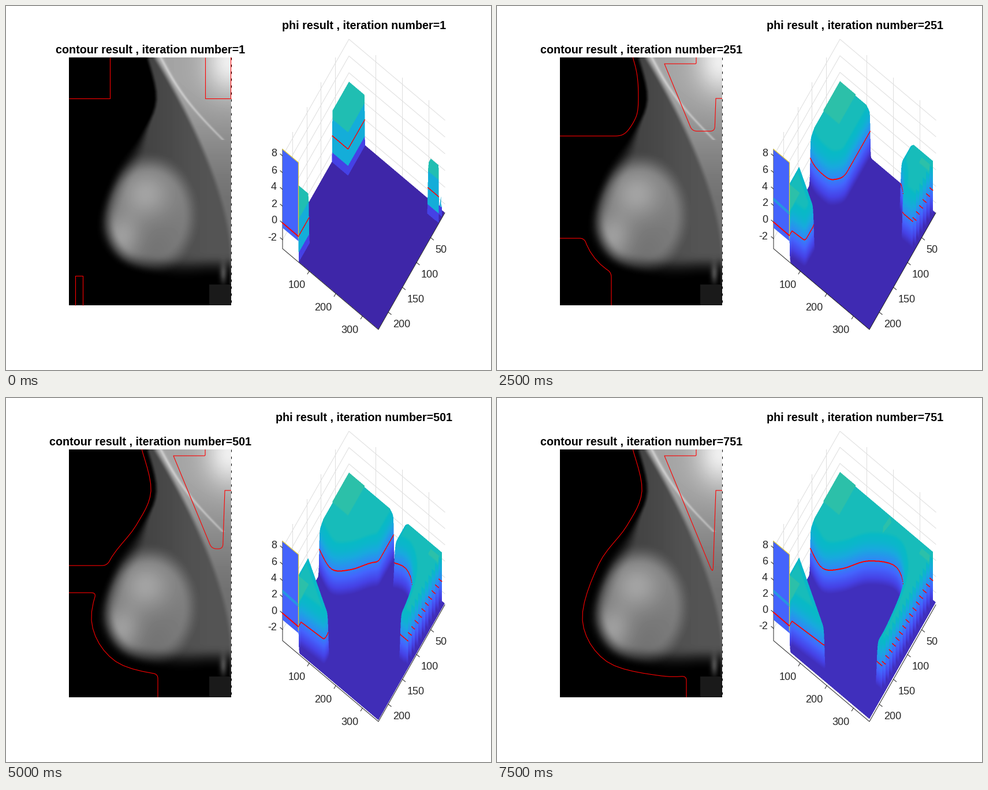
A matplotlib script that plays this animation: 840x630 px, repeating every 8000 ms.

```python
import numpy as np
import matplotlib.pyplot as plt
from matplotlib.animation import FuncAnimation
from matplotlib.colors import LinearSegmentedColormap

W, H = 840, 630
FRAMES, STEP = 16, 50
LAST = STEP * (FRAMES - 1)
SS = 2                                    # supersampling of the surface
COLS, ROWS = 235, 360
ORIGIN = np.array([594, 218])             # floor corner at column 0, row 0
CU = np.array([-115, 202]) / COLS         # screen step per column
RU = np.array([166, 140]) / ROWS          # screen step per row
X0, X1, Y0, Y1 = 109, 390, 89, 518        # image box
PX = (X1 - X0) / COLS
INK, GRID = "#262626", "#dedede"

PARULA = LinearSegmentedColormap.from_list("parula", [
    (0, "#3e26a8"), (.1, "#4642e6"), (.2, "#4464fe"), (.3, "#2d8cf3"),
    (.4, "#18aade"), (.5, "#08bac6"), (.53, "#2cc0aa"), (1, "#f9fb15")], N=512)


def smooth(d, a, b):
    t = np.clip((d - a) / (b - a), 0, 1)
    return t * t * (3 - 2 * t)


def curve(keys, n=6):
    """Catmull-Rom curve through a few key points."""
    p = np.array(keys[:1] + keys + keys[-1:], float)
    t = (np.arange(n) / n)[:, None]
    parts = [b + t * (c - a) / 2 + t**2 * (a - 2.5 * b + 2 * c - d / 2)
             + t**3 * (1.5 * (b - c) + (d - a) / 2)
             for a, b, c, d in zip(p, p[1:], p[2:], p[3:])]
    return [tuple(q) for q in np.vstack(parts + [p[-1:]])]


def sdf(x, y, pts):
    """Signed distance to a polygon, negative inside."""
    dist = np.full(x.shape, 1e9)
    inside = np.zeros(x.shape, bool)
    for (px_, py), (qx, qy) in zip(pts, pts[1:] + pts[:1]):
        ex, ey = qx - px_, qy - py
        t = np.clip(((x - px_) * ex + (y - py) * ey) / (ex * ex + ey * ey), 0, 1)
        dist = np.minimum(dist, (x - px_ - t * ex) ** 2 + (y - py - t * ey) ** 2)
        if ey:
            inside ^= ((py > y) != (qy > y)) & (x < px_ + (y - py) * ex / ey)
    return np.sqrt(dist) * np.where(inside, -1, 1)


def smax(a, b, k):
    """Maximum with its crease rounded over k."""
    h = np.maximum(k - np.abs(a - b), 0) / k
    return np.maximum(a, b) + h * h * k / 4


def corner(x, y, r):
    """Quarter plane x<0, y<0 with a rounded corner."""
    qx, qy = x + r, y + r
    return (np.minimum(np.maximum(qx, qy), 0)
            + np.hypot(np.maximum(qx, 0), np.maximum(qy, 0)) - r)


# What the growing regions cannot cross, in stage pixels
BODY = curve([(235, 88), (251, 161), (225, 221), (176, 288), (148, 385),
              (190, 456), (285, 481), (352, 479)])
BODY += [(500, 479), (500, -100), (235, -100)]
MUSCLE = [(290, 100), (374, 304), (379, 160), (379, 100)]


class Field:
    """Three regions that grow from seeds; negative inside."""

    def __init__(self, x, y):
        self.x, self.y = x, y
        self.body = sdf(x, y, BODY)
        self.muscle = sdf(x, y, MUSCLE)

    def at(self, it):
        x, y, n = self.x, self.y, it - 1
        g = .26 * n
        r, k = min(g, 40), min(8, .05 + .3 * g)
        a = smax(corner(x - 180 - g, y - 160 - g, r), -self.body, k)
        b = np.maximum(corner(x - 133 - g, 467 - g - y, r), 120 - g - x)
        b = smax(b, -self.body, k)
        c = smax(corner(345 - g - x, y - 160 - .56 * n**.836, r), self.muscle, k)
        c = np.minimum(c, corner(345 - x, y - 160, 0))
        return np.minimum(np.minimum(a, b), c)


def glow(x, y, cx, cy, rx, ry):
    return np.exp(-((x - cx) / rx) ** 2 - ((y - cy) / ry) ** 2)


def scan(x, y, body):
    """Soft grey tones standing in for the picture."""
    depth = -body - 6
    low = smooth(y, 190, 300)
    v = (66 + 18 * smooth(x, 220, 360)) * smooth(depth, -1, 8 + 32 * low)
    v = v * (1 - .65 * smooth(y, 425, 475))
    core = smooth(1 - np.hypot((x - 247) / 84, (y - 362) / 105), -.08, .3)
    tissue = 45 + 50 * glow(x, y, 240, 325, 45, 45) + 45 * glow(x, y, 200, 400, 34, 40)
    v = v + core * tissue * smooth(depth, 0, 20)
    rib = 390 - 132 * (np.clip(435 - y, 0, None) / 345) ** 1.6
    m = smooth(x - rib, -5, 7) * (y < 482)
    bright = 112 + 52 * smooth(-y, -360, -120) + 75 * glow(x, y, 388, 95, 42, 55)
    v = v * (1 - m) + bright * m
    s = (y - 92) / 140
    streak = x - 270 - 107 * s + 10 * np.sin(np.pi * s)
    v = v + 38 * np.exp(-(streak / 3) ** 2) * (s < 1)
    v = v + 70 * glow(x, y, 377, 464, 6, 16)
    v = np.where((y > 482) & (x > 352), 26, v)
    return np.clip(v, 0, 240)


ix, iy = np.meshgrid(np.arange(X0, X1 + 1.), np.arange(Y0, Y1 + 1.))
image_field = Field(ix, iy)

# Floor grid in screen space; every column of it is one line of sight
U0, U1, V0, V1, TOP = 478, 762, 216, 563, 100
su, sv = np.meshgrid(np.arange(U0, U1, 1 / SS) + .5 / SS,
                     np.arange(V0, V1, 1 / SS) + .5 / SS)
dx, dy = su - ORIGIN[0], sv - ORIGIN[1]
det = CU[0] * RU[1] - CU[1] * RU[0]
col = (dx * RU[1] - dy * RU[0]) / det
row = (CU[0] * dy - CU[1] * dx) / det
floor = (col >= 0) & (col <= COLS) & (row >= 0) & (row <= ROWS)
floor_field = Field(X0 + col * PX, Y0 + row * (Y1 - Y0) / ROWS)
seeds = floor_field.at(1) < -1

# Jagged cut along the last row; its long sides follow the line of sight
notch = 359 - 12.7 * (1 - ((col + 3) % 12) / 12)
teeth = np.where((row > 340) & (col < 195), 20 * (row - notch), -999)


def z_scale(it):
    """Height of z=0 above the axis floor and pixels per unit."""
    zero = 44.5 + 4.5 * (it - 1) / LAST
    return zero, (160.5 - zero) / 8


def heights(it):
    d = np.maximum(floor_field.at(it) / PX, teeth)
    if it == 1:
        return np.interp(d, [-1.5, -.5, .5, 1.5], [2.94, 1.95, -1.95, -3.05])
    t = np.tanh(-d / 1.6)
    z = np.where(d < 0, 2.35 * t + .4 * smooth(-d, 2, 16), 3.2 * t)
    return np.where(seeds & (d < -1), 2.94, z)


def surface(it):
    zero, k = z_scale(it)
    z = heights(it)
    p = (sv - TOP - zero - k * z) * SS
    ok = floor[:-1] & floor[1:]
    a, b, za, zb = p[:-1][ok], p[1:][ok], z[:-1][ok], z[1:][ok]
    u = np.nonzero(ok)[1]
    lo = np.floor(np.minimum(a, b)).astype(int)
    n = np.floor(np.maximum(a, b)).astype(int) - lo + 1
    i = np.repeat(np.arange(n.size), n)
    y = lo[i] + np.arange(n.sum()) - np.repeat(np.cumsum(n) - n, n)
    span = np.where(np.abs(b - a) < 1e-6, 1e-6, b - a)
    t = np.clip((y + .5 - a[i]) / span[i], 0, 1)
    buf = np.full(((V1 - TOP) * SS, su.shape[1]), np.nan)
    buf[np.clip(y, 0, len(buf) - 1), u[i]] = za[i] + (zb - za)[i] * t  # back to front

    solid = ~np.isnan(buf)
    h = np.where(solid, buf, -9)
    if it == 1:
        tone = np.select([h > 1.95, h > -1.95, h > -3.03], [.52, .42, .1], 0)
    else:
        tone = np.maximum((h + 3.2) / 11.6, .01 + .025 * it / LAST)
    rgba = PARULA(tone)
    rgba[..., 3] = solid
    zero_line = np.abs(h) * k * SS < 1
    wide = zero_line.copy()
    for shift in (1, -1):
        for axis in (0, 1):
            wide |= np.roll(zero_line, shift, axis)
    rgba[wide] = (1, 0, 0, 1)
    rgba[..., :3] *= rgba[..., 3:]
    hh, ww = buf.shape
    rgba = rgba.reshape(hh // SS, SS, ww // SS, SS, 4).mean((1, 3))
    rgba[..., :3] /= np.maximum(rgba[..., 3:], 1e-6)
    return np.clip(rgba, 0, 1)


plt.rcParams["font.family"] = "Liberation Sans"
fig = plt.figure(figsize=(W / 100, H / 100), dpi=100, facecolor="white")
ax = fig.add_axes([0, 0, 1, 1])
ax.axis("off")


def px(n):
    return n * .72


def line(xs, ys, color=INK, w=1, z=3, **kw):
    return ax.plot(xs, ys, color=color, lw=px(w), zorder=z, **kw)[0]


def label(x, y, s, size=18, ha="center", color=INK, **kw):
    return ax.text(x, y, s, fontsize=px(size), ha=ha, va="baseline", color=color, **kw)


def spot(c, r):
    return ORIGIN + c * CU + r * RU


title = dict(size=19.8, weight="bold", color="black")
left_title = label(249.7, 82, "", **title)
right_title = label(619.7, 40, "", **title)

ax.imshow(scan(ix, iy, image_field.body), cmap="gray", vmin=0, vmax=255,
          extent=(X0, X1, Y1, Y0), aspect="auto", zorder=1)
line([389.5, 389.5], [Y0, Y1], "black", 1, 2, ls=(0, (4, 8)))
rim = line([388.5, 388.5], [Y0, 160], "red", 1, 4)

# Walls, axes and ticks
for c in range(50, 201, 50):
    x, y = spot(c, 0)
    line([x, x], [y - 172, y], GRID, 1, 1)
    x, y = spot(c, ROWS)
    line([x, x + 5], [y, y + 4])
    label(x + 8, y + 26.5, str(c), ha="left")
for r in range(100, 301, 100):
    x, y = spot(0, r)
    line([x, x], [y - 172, y], GRID, 1, 1)
    x, y = spot(COLS, r)
    line([x, x - 3], [y, y + 5])
    label(x - 21.5, y + 29.5, str(r))
line([479, 479, 645, 760], [248, 420, 560, 358])
LEVELS = range(-2, 9, 2)
walls = [line([479, 594, 760], [0, 0, 0], GRID, 1, 1) for _ in LEVELS]
ticks = [line([479, 475], [0, 0]) for _ in LEVELS]
z_labels = [label(469, 0, str(v), ha="right") for v in LEVELS]

view = ax.imshow(np.zeros((V1 - TOP, U1 - U0, 4)), extent=(U0, U1, V1, TOP),
                 aspect="auto", interpolation="nearest", zorder=2)

# Spike of the last column
ax.fill([479, 506.5, 506.5, 479], [248, 271, 407, 384], color="#4464fc", lw=0, zorder=4)
line([479, 506.5, 506.5], [248, 271, 402], "#dcc83c", 1.3, 5)
stripes = [line([479, 506], [y, y + 24], "#14b4d2", 1.3, 5) for y in (336, 333)]
cut = line([479, 506], [0, 0], "red", 2, 6)
ridge = ax.fill([668, 669, 681, 683], [234, 222, 205, 216], color="#2cc0aa",
                lw=0, zorder=3)[0]

ax.set_xlim(0, W)
ax.set_ylim(H, 0)
outline = [None]


def update(i):
    it = 1 + STEP * i
    left_title.set_text(f"contour result , iteration number={it}")
    right_title.set_text(f"phi result , iteration number={it}")

    if outline[0] is not None:
        outline[0].remove()
    outline[0] = ax.contour(ix, iy, image_field.at(it), [0], colors="red",
                            linewidths=px(1.1), zorder=4)
    rim.set_visible(it == 1)

    view.set_data(surface(it))
    zero, k = z_scale(it)
    for v, wall, tick, text in zip(LEVELS, walls, ticks, z_labels):
        up = zero + k * v
        wall.set_ydata([420 - up, 218 - up, 358 - up])
        tick.set_ydata([420 - up, 416.5 - up])
        text.set_y(421 - up)
    cut.set_ydata([420 - zero, 443 - zero])
    for stripe in stripes:
        stripe.set_visible(it > 1)
    ridge.set_visible(it > 600)
    return []


anim = FuncAnimation(fig, update, frames=FRAMES, init_func=lambda: [],
                     interval=500, repeat=True, repeat_delay=0, blit=False)
plt.show()
```
